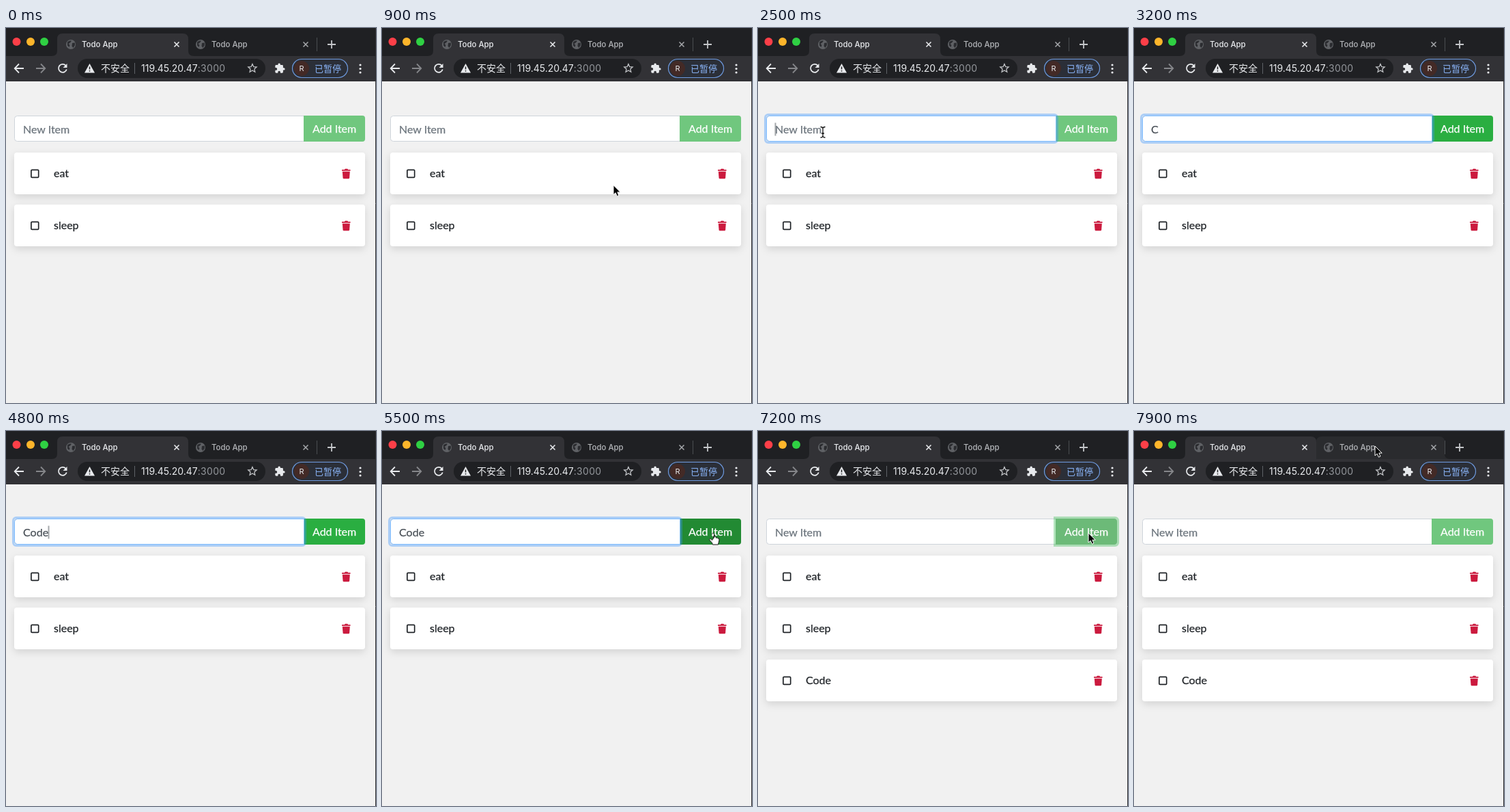
An HTML page for the animation above (8 s loop, 542 px wide and 548 px high).

```html
<!DOCTYPE html>
<html lang="en">
<head>
<meta charset="utf-8">
<title>Todo App</title>
<style>
html, body { margin: 0; width: 100%; height: 100%; overflow: hidden; background: #f1f1f1; }
svg { display: block; width: 542px; height: 548px; }
.page text { font: 16px Lato, sans-serif; stroke-width: .25px; }
.item text { fill: #212529; stroke: #212529; }
.chrome text { font-family: Inter, sans-serif; fill: #e8eaed; }
.chrome .tab { font-size: 11.4px; font-weight: 500; }
.chrome .cjk { font-family: "Noto Sans CJK SC", "Noto Sans CJK", sans-serif; }
.line { fill: none; stroke: #e8eaed; stroke-width: 1.8; }
.dim { stroke: #85868a; }
.card { fill: #fff; filter: drop-shadow(0 4px 6px rgba(0, 0, 0, .12)); }

/* one shared 8 s clock: 1% = 80 ms */
.a { animation: 8s linear infinite; }
.s { animation: 8s step-end infinite; }
#hint { animation-name: hint; }
#k1 { animation-name: k1; }
#k2 { animation-name: k2; }
#k3 { animation-name: k3; }
#k4 { animation-name: k4; }
#caret { animation-name: caret; }
#caretPos { animation-name: caretPos; }
#fieldRing { animation-name: fieldRing; }
#btnRing { animation-name: btnRing; }
#btn { animation-name: btn; }
#added { animation-name: added; }
#mouse { animation-name: mouse; }
#arrow { animation-name: arrow; }
#beam { animation-name: beam; }
#hand { animation-name: hand; }
#tabHover { animation-name: tabHover; }

@keyframes hint { 0%, 76.875% { opacity: 1 } 33.125% { opacity: 0 } }
@keyframes k1 { 0%, 76.875%, 100% { opacity: 0 } 33.125% { opacity: 1 } }
@keyframes k2 { 0%, 76.875%, 100% { opacity: 0 } 47.5% { opacity: 1 } }
@keyframes k3 { 0%, 76.875%, 100% { opacity: 0 } 53.75% { opacity: 1 } }
@keyframes k4 { 0%, 76.875%, 100% { opacity: 0 } 58.125% { opacity: 1 } }
@keyframes caret {
  0%, 23.75%, 39.375%, 64.375%, 100% { opacity: 0 }
  17.5%, 30%, 45.625%, 70.625% { opacity: 1 }
  72.5% { opacity: 0 }
}
@keyframes caretPos {
  0%, 100% { transform: translateX(25.5px) }
  33.125% { transform: translateX(36px) }
  47.5% { transform: translateX(45px) }
  53.75% { transform: translateX(54px) }
  58.125% { transform: translateX(62.5px) }
}
@keyframes fieldRing { 0%, 17%, 74.4%, 100% { opacity: 0 } 18.7%, 72.5% { opacity: 1 } }
@keyframes btnRing { 0%, 72.5%, 92.5%, 100% { opacity: 0 } 74.4%, 91% { opacity: 1 } }
@keyframes btn {
  0%, 33.125%, 92.5%, 100% { fill: #70c77e }
  35%, 66.5% { fill: #2aae41 }
  68%, 76.6% { fill: #228a33 }
  78.4%, 91% { fill: #6cba78 }
}
@keyframes added { 0%, 100% { opacity: 0 } 76.875% { opacity: 1 } }
@keyframes mouse {
  0%, 9% { transform: translate(560px, 300px); animation-timing-function: ease-out }
  16%, 61% { transform: translate(95px, 152px); animation-timing-function: ease-in-out }
  67.5%, 76% { transform: translate(485px, 149.5px) }
  78%, 90% { transform: translate(484px, 149px); animation-timing-function: ease-in-out }
  97.5%, 100% { transform: translate(353px, 22px) }
}
@keyframes arrow { 0%, 76.875%, 100% { opacity: 1 } 14% { opacity: 0 } }
@keyframes beam { 0%, 33.125%, 66.5%, 100% { opacity: 0 } 14%, 61% { opacity: 1 } }
@keyframes hand { 0%, 76.875%, 100% { opacity: 0 } 66.5% { opacity: 1 } }
@keyframes tabHover { 0%, 95.5% { opacity: 0 } 98%, 100% { opacity: 1 } }
</style>
</head>
<body>
<svg viewBox="0 0 542 548">
  <defs>
    <g id="globe">
      <circle r="7" fill="#5f6165"/>
      <path d="M-5-3.5Q-2-6 1-5.2L-1-2.5-3.5-1-1.5 1-2.5 4-5 1.5ZM2-2 5.8-2.6 6 1 3.5 5 1.5 2.5Z" fill="#2b2c30"/>
    </g>
    <path id="close" d="M-3.5-3.5 3.5 3.5M3.5-3.5-3.5 3.5"/>
    <g id="row">
      <rect class="card" x="12" y="182" width="514" height="61" rx="4"/>
      <rect x="36.9" y="207.4" width="10.8" height="11" rx="1.2" fill="none" stroke="#212529" stroke-width="1.7"/>
      <g fill="#cb1a3e">
        <path d="M492 207h3.9l.8-1.3h3.6l.8 1.3h3.4v1.8H492z"/>
        <path d="M492.8 209.7h11l-.7 9.2q-.1 1.3-1.4 1.3h-6.8q-1.3 0-1.4-1.3z"/>
      </g>
    </g>
  </defs>

  <g class="page">
    <rect width="542" height="548" fill="#f1f1f1"/>

    <path d="M436.5 128.5H16.5a4 4 0 0 0-4 4v29a4 4 0 0 0 4 4h420z" fill="#fff" stroke="#ced4da"/>
    <path id="btn" class="a" fill="#70c77e" d="M436 128h86a4 4 0 0 1 4 4v30a4 4 0 0 1-4 4h-86z"/>
    <text x="449" y="153" fill="#fff" stroke="#fff">Add Item</text>
    <path id="btnRing" class="a" opacity="0" d="M434.5 126.5H523a4.5 4.5 0 0 1 4.500 4.500v32a4.500 4.500 0 0 1-4.500 4.500h-88.500z" fill="none" stroke="#28b545" stroke-opacity=".35" stroke-width="3"/>
    <g id="fieldRing" class="a" opacity="0" fill="none">
      <rect x="10.500" y="126.500" width="428" height="41" rx="4.500" stroke="#3d96ff" stroke-opacity=".38" stroke-width="3"/>
      <path d="M436.500 128.500H16.500a4 4 0 0 0-4 4v29a4 4 0 0 0 4 4h420z" stroke="#80bdff"/>
    </g>

    <text id="hint" class="s" x="25" y="154" fill="#6c757d" stroke="#6c757d">New Item</text>
    <text x="25" y="154" fill="#495057" stroke="#495057"><tspan></tspan></text>
    <g fill="#495057" stroke="#495057">
      <text id="k1" class="s" x="25" y="154" opacity="0">C</text>
      <text id="k2" class="s" x="35.600" y="154" opacity="0">o</text>
      <text id="k3" class="s" x="44.800" y="154" opacity="0">d</text>
      <text id="k4" class="s" x="53.800" y="154" opacity="0">e</text>
    </g>
    <g id="caretPos" class="s"><path id="caret" class="s" opacity="0" d="M0 138.500V157.500" stroke="#495057"/></g>

    <g class="item"><use href="#row"/><text x="70" y="218">eat</text></g>
    <g class="item" transform="translate(0 76)"><use href="#row"/><text x="70" y="218">sleep</text></g>
    <g id="added" class="s" opacity="0">
      <g class="item" transform="translate(0 152)"><use href="#row"/><text x="70" y="218">Code</text></g>
    </g>
  </g>

  <g class="chrome">
    <rect width="542" height="42" fill="#1f2023"/>
    <rect y="41" width="542" height="37" fill="#323236"/>
    <path d="M67 41q8 0 8-8V16q0-8 8-8h176q8 0 8 8v17q0 8 8 8z" fill="#323236"/>
    <path id="tabHover" class="a" opacity="0" d="M267 41V16q0-8 8-8h172q8 0 8 8v17q0 8 8 8z" fill="#2a2b2e"/>
    <circle cx="15.500" cy="20" r="6" fill="#fd3f48"/>
    <circle cx="36" cy="20" r="6" fill="#fdb52b"/>
    <circle cx="56" cy="20" r="6" fill="#2fd043"/>

    <use href="#globe" x="95" y="24"/>
    <use href="#globe" x="285" y="24"/>
    <text class="tab" x="111" y="28">Todo App</text>
    <text class="tab" x="301" y="28" style="fill:#b4b6ba">Todo App</text>
    <use href="#close" x="250" y="24" class="line" style="stroke-width:1.600"/>
    <use href="#close" x="439" y="24" class="line" style="stroke:#a5a7ab;stroke-width:1.500"/>
    <path d="M455.500 14v20" stroke="#4b4d51"/>
    <path class="line" d="M471 24h12M477 18v12" style="stroke:#c4c6c9"/>

    <path class="line" d="M26 59H13M19 52.500 12.700 59 19 65.500"/>
    <path class="line dim" d="M44 59h13M51 52.500 57.300 59 51 65.500"/>
    <path class="line" d="M87.500 54.800A6 6 0 1 0 88.800 60.500"/>
    <path d="M89.500 52v6h-6z" fill="#e8eaed"/>

    <rect x="105" y="45" width="275" height="28" rx="14" fill="#1f2023"/>
    <path d="M122.500 52 130 65.500H115z" fill="#e8eaed"/>
    <path d="M122.500 56.500v4M122.500 62v1.600" stroke="#1f2023" stroke-width="1.500"/>
    <text class="cjk" x="139" y="64" font-size="14">不安全</text>
    <path d="M188.500 51v16" stroke="#5f6368"/>
    <text x="198" y="64" font-size="14">119.45.20.47<tspan fill="#94979c" letter-spacing=".3">:3000</tspan></text>
    <path transform="translate(353.500 51) scale(.62)" d="M12 2.500l2.900 6.600 7.100.6-5.400 4.700 1.600 7-6.200-3.700-6.200 3.700 1.600-7L2 9.700l7.100-.6z" fill="none" stroke="#c4c6c9" stroke-width="2"/>
    <path transform="translate(393 50.700) scale(.68)" fill="#e8eaed" d="M20.500 11H19V7c0-1.100-.9-2-2-2h-4V3.500a2.500 2.500 0 0 0-5 0V5H4c-1.100 0-2 .9-2 2v3.800h1.500a2.700 2.700 0 0 1 0 5.400H2V20c0 1.100.9 2 2 2h3.800v-1.500a2.700 2.700 0 0 1 5.400 0V22H17c1.100 0 2-.9 2-2v-4h1.500a2.500 2.500 0 0 0 0-5z"/>
    <rect x="419.500" y="45.500" width="81" height="27" rx="13.500" fill="#2b2f38" stroke="#6f9be0" stroke-width="1.200"/>
    <circle cx="433" cy="59" r="11" fill="#432a26"/>
    <text x="433" y="63" font-size="11" text-anchor="middle">R</text>
    <text class="cjk" x="452" y="64" font-size="13" style="fill:#8ab4f8">已暂停</text>
    <g fill="#e8eaed">
      <circle cx="519" cy="54" r="1.600"/><circle cx="519" cy="59.500" r="1.600"/><circle cx="519" cy="65" r="1.600"/>
    </g>
  </g>
  <path d="M541.500 0V548" stroke="#2b2b2d"/>

  <g id="mouse" class="a">
    <path id="arrow" class="s" d="M0 0V14L3.200 11.200 5.400 16.200 7.900 15.100 5.800 10.200H10.200Z" fill="#000" stroke="#fff"/>
    <g id="beam" class="s" opacity="0" fill="none">
      <path d="M-3.500-7.500Q0-7.500 0-5V5.500Q0 8-3.500 8M3.500-7.500Q0-7.500 0-5M0 5.500Q0 8 3.500 8M-2 2H2" stroke="#fff" stroke-width="3"/>
      <path d="M-3.500-7.500Q0-7.500 0-5V5.500Q0 8-3.500 8M3.500-7.500Q0-7.500 0-5M0 5.500Q0 8 3.500 8M-2 2H2" stroke="#111" stroke-width="1.300"/>
    </g>
    <path id="hand" class="s" opacity="0" d="M-1.500 1.500C-1.500-.6 1.500-.6 1.500 1.500V6Q3-.0 0 6M1.500 6C2-.0 2 5 3.800 5.400Q4.500 5.600 4.400 6.800 6.900 5.400 7 7.600 9.300 6.900 9 9.500L8.300 13 7.300 16.500H-.5L-1.500 14-5.300 9.800C-6 8-4 7.300-2.800 8.800L-1.500 10Z" fill="#fff" stroke="#111" stroke-linejoin="round"/>
  </g>
</svg>
</body>
</html>
```
